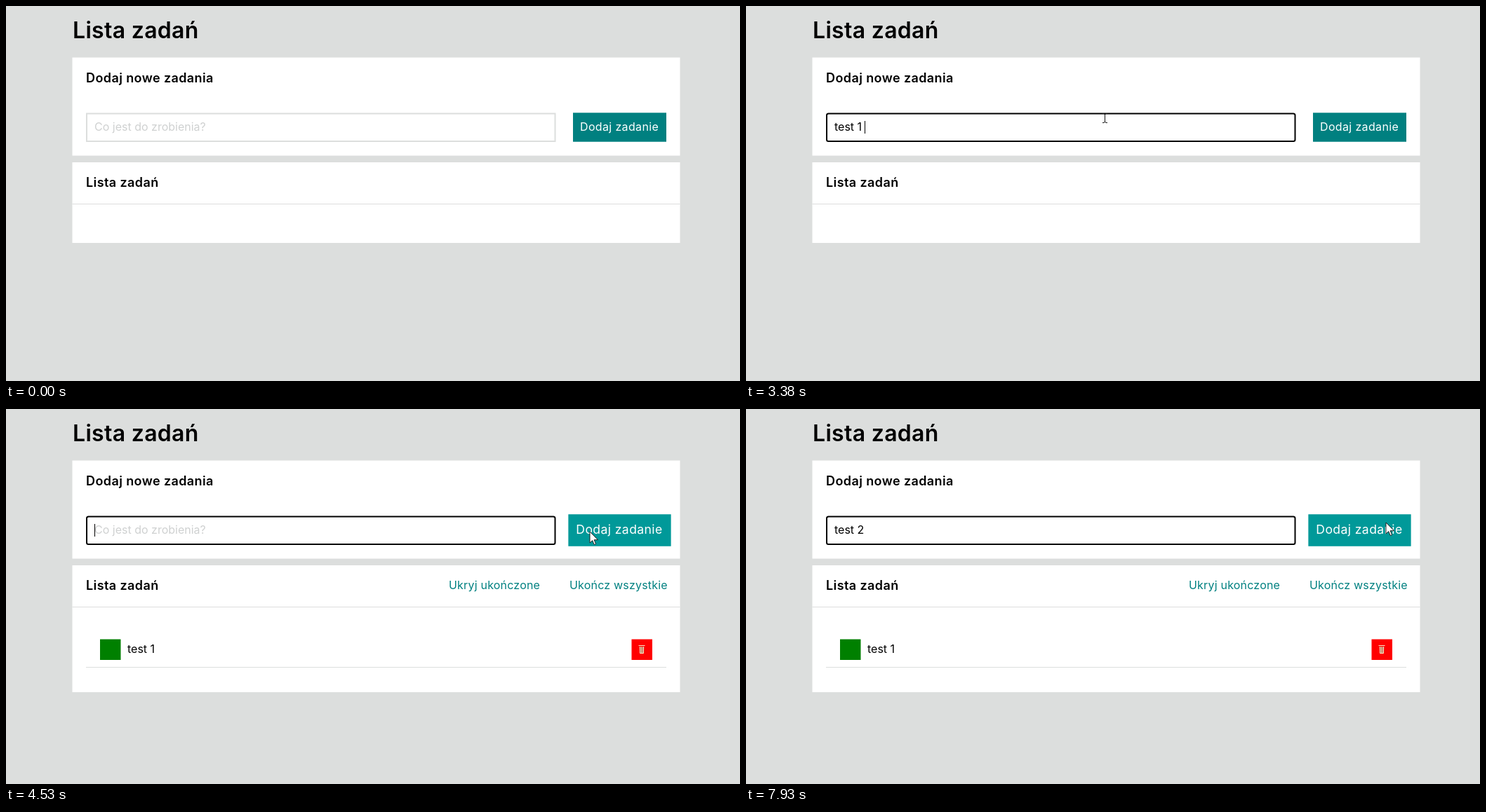
Animation of 1046 by 535 pixels, one loop 8000 ms. Source, as an HTML page:

```html
<!DOCTYPE html>
<html lang="pl">
<head>
<meta charset="utf-8">
<title>Lista zadań</title>
<style>
  html, body { margin: 0; width: 100%; height: 100%; overflow: hidden; background: #dcdedd; }
  svg { display: block; width: 1046px; height: 535px; }
  text { font: 400 16px Montserrat, Inter, sans-serif; white-space: pre; }
  .title { font-size: 32px; font-weight: 600; letter-spacing: .3px; }
  .heading { font-size: 18px; font-weight: 600; letter-spacing: .4px; }
  .label { fill: #fff; letter-spacing: .35px; }
  .link { fill: #008080; letter-spacing: .2px; }
  .hint { fill: #cfd1d1; }
  .rule { stroke: #dcdedd; }
</style>
</head>
<body>
<svg viewBox="0 0 1046 535">
  <rect width="1046" height="535" fill="#dcdedd"/>
  <text class="title" x="95" y="46">Lista zadań</text>

  <rect x="94.5" y="73.5" width="866" height="140" fill="#fff"/>
  <text class="heading" x="114" y="109">Dodaj nowe zadania</text>
  <rect id="field" x="115" y="153.5" width="667.5" height="39.5" fill="#fff" stroke-width="2"/>
  <text id="hint" class="hint" x="126" y="178">Co jest do zrobienia?</text>
  <text id="typed" x="126" y="178"></text>
  <rect id="caret" y="164" width="1" height="18"/>
  <g id="button">
    <rect id="face" x="808" y="152.3" width="133" height="41.4"/>
    <text class="label" x="818" y="178">Dodaj zadanie</text>
  </g>

  <rect id="card" x="94.5" y="223" width="866" fill="#fff"/>
  <text class="heading" x="114" y="258">Lista zadań</text>
  <path class="rule" d="M94.5 282.5H960.5"/>
  <g id="tasks">
    <text class="link" x="631" y="257">Ukryj ukończone</text>
    <text class="link" x="803" y="257">Ukończ wszystkie</text>
    <rect x="134" y="328.5" width="29.5" height="29.5" fill="#008000"/>
    <text x="173" y="348">test 1</text>
    <rect x="891.5" y="328.5" width="29.5" height="29.5" fill="#f00"/>
    <path d="M902.5 339.5L903.5 348.5H908.5L909.5 339.5Z" fill="#b86a50"/>
    <path d="M901.5 337.5H910.5M903.5 339V348.5H908.5V339M906 339V348" fill="none" stroke="#ffe9c9"/>
    <path class="rule" d="M114 368.5H941"/>
  </g>

  <path id="arrow" d="M0 0V16L3.7 12.6L6.2 18.5L8.6 17.5L6.1 11.7H11.5Z" fill="#fff" stroke="#222"/>
  <path id="beam" d="M-3 -6.5H-1L.5 -5.5L2 -6.5H4M-3 6.5H-1L.5 5.5L2 6.5H4M.5 -6V6" fill="none" stroke="#111"/>
  <circle id="ring" r="12" fill="#ff0"/>
</svg>
<script>
const LOOP = 8000;
const el = Object.fromEntries([...document.querySelectorAll('[id]')].map(e => [e.id, e]));

// Pointer strokes: start time, step length, step count, quadratic curve.
const strokes = [
  { at: 170, step: 77, count: 11, from: [948, 535], via: [600, 0], to: [511, 160] },
  { at: 3840, step: 77, count: 7, from: [511, 160], via: [700, 95], to: [832, 175] },
  { at: 4680, step: 82, count: 6, from: [832, 175], via: [680, 172], to: [719, 170] },
  { at: 7530, step: 80, count: 6, from: [719, 170], via: [815, 150], to: [912, 162] }
];
const clicks = [[1000, 1240, 511, 160], [4380, 4530, 831, 175]];
const hovers = [[4300, 4680], [7690, LOOP]];
const typing = [
  { text: 'test 1 ', keys: [1960, 2190, 2360, 2600, 2830, 3130, 3380], end: 4530 },
  { text: 'test 2 ', keys: [5780, 6010, 6180, 6410, 6490, 6900, 7050], end: LOOP }
];
const focusSpans = [[1080, 4380], [4530, LOOP]];
const caretSpans = [[1080, 1660], [1960, 3840], [4530, 5620], [5780, 7530]];

const within = (t, spans) => spans.some(([a, b]) => t >= a && t < b);
const show = (node, on) => node.setAttribute('display', on ? 'inline' : 'none');
const set = (node, attrs) => {
  for (const key in attrs) node.setAttribute(key, attrs[key]);
};
const clamp = v => Math.max(0, Math.min(1, v));
const ease = v => v * v * (3 - 2 * v);

function pointerAt(t) {
  const s = strokes.filter(p => t >= p.at).pop();
  if (!s) return null;
  const u = Math.min(1, (Math.floor((t - s.at) / s.step) + 1) / s.count);
  return s.from.map((a, i) => (1 - u) ** 2 * a + 2 * u * (1 - u) * s.via[i] + u * u * s.to[i]);
}

function typedAt(t) {
  const run = typing.find(r => t >= r.keys[0] && t < r.end);
  return run ? run.text.slice(0, run.keys.filter(k => t >= k).length) : '';
}

function drawField(t) {
  const focused = within(t, focusSpans);
  const text = typedAt(t);
  set(el.field, { stroke: focused ? '#000' : '#dcdedd', rx: focused ? 2.5 : 0 });
  if (el.typed.textContent !== text) el.typed.textContent = text;
  show(el.hint, !text);
  show(el.caret, within(t, caretSpans));
  const width = text ? el.typed.getComputedTextLength() : 0;
  el.caret.setAttribute('x', Math.round(126 + width - .4));
}

function drawButton(t) {
  const grow = Math.max(...hovers.map(([a, b]) =>
    ease(clamp((t - a) / 150)) * (1 - ease(clamp((t - b) / 150)))));
  const level = Math.round(128 + 25 * grow) + (t >= 4380 && t < 4530 ? 4 : 0);
  el.face.setAttribute('fill', `rgb(0,${level},${level})`);
  el.button.setAttribute('transform',
    `translate(874.5 173) scale(${1 + .1 * grow}) translate(-874.5 -173)`);
}

function drawPointer(t) {
  const p = pointerAt(t);
  const overField = p && p[0] > 114 && p[0] < 783 && p[1] > 152 && p[1] < 194;
  show(el.arrow, p && !overField);
  show(el.beam, overField);
  if (p) {
    const place = `translate(${Math.round(p[0])} ${Math.round(p[1])})`;
    set(el.arrow, { transform: place });
    set(el.beam, { transform: place });
  }
  const click = clicks.find(([a, b]) => t >= a && t < b);
  show(el.ring, click);
  if (click) {
    const [a, , cx, cy] = click;
    set(el.ring, { cx, cy, opacity: t - a < 160 ? .55 : .25 });
  }
}

function draw(t) {
  const added = t >= 4530;
  drawField(t);
  drawButton(t);
  el.card.setAttribute('height', added ? 181 : 115);
  show(el.tasks, added);
  drawPointer(t);
}

const start = performance.now();
function tick() {
  draw((performance.now() - start) % LOOP);
  requestAnimationFrame(tick);
}
tick();
</script>
</body>
</html>
```
